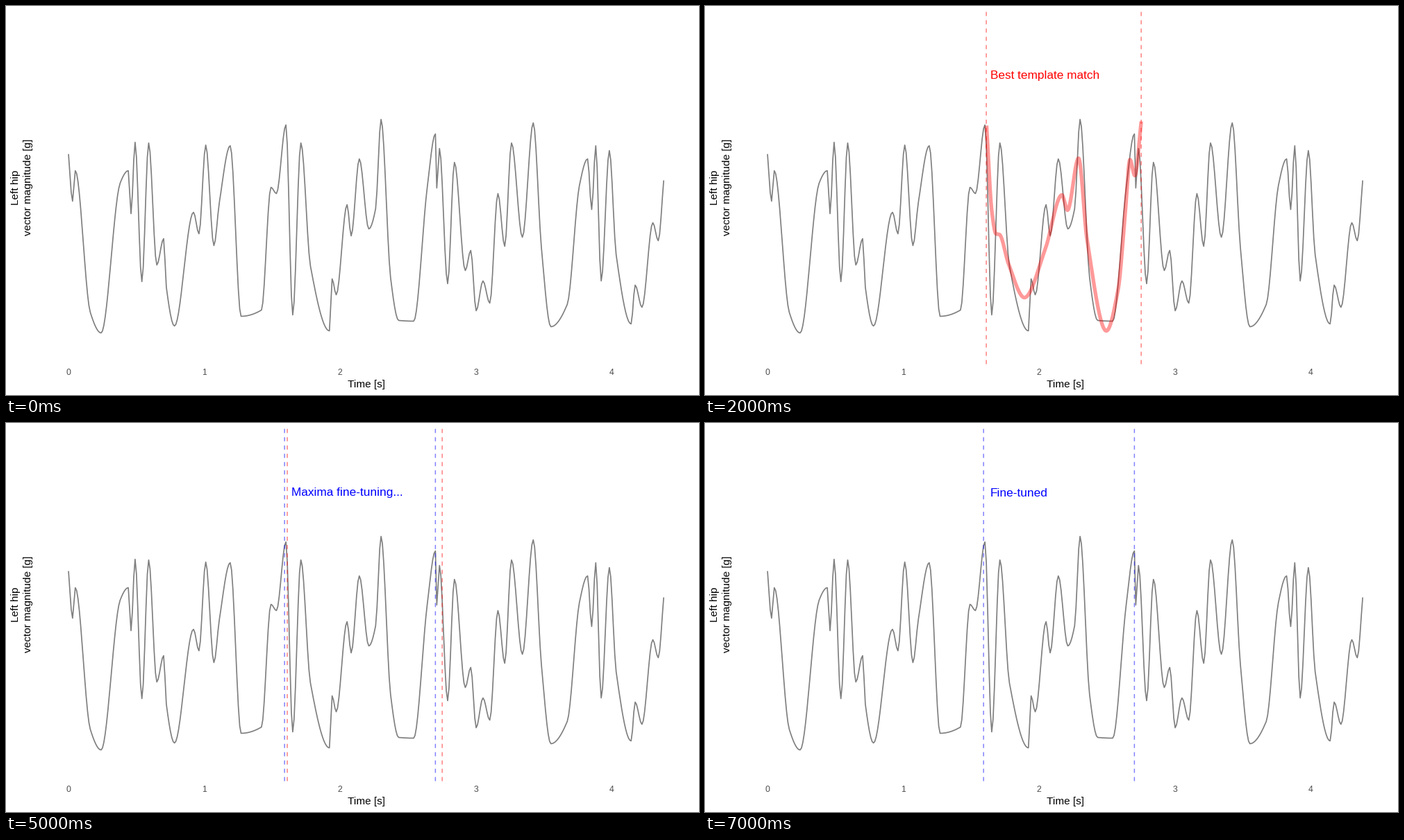
A matplotlib script that plays this animation: 998x561 px, repeating every 8000 ms.

```python
import numpy as np
import matplotlib.pyplot as plt
from matplotlib.animation import FuncAnimation

W, H, DPI = 998, 561, 100
X0, STEP = 90.0, 1.957          # pixel of time zero, pixels per 0.01 s sample
TOP, BOTTOM = 8, 516
PT = 72 / DPI                   # points per pixel

plt.rcParams["font.family"] = "Liberation Sans"

# Main turning points of the signal: (sample, pixel height)
SIGNAL = [
    (0, 213), (3, 281), (5, 237), (16, 441), (24, 471), (38, 255), (44, 237),
    (46, 299), (49, 196), (54, 397), (59, 197), (65, 373), (70, 335),
    (72, 405), (78, 461), (92, 297), (96, 328), (101, 200), (107, 345),
    (111, 283), (119, 201), (127, 447), (142, 438), (149, 261), (153, 270),
    (160, 171), (165, 445), (171, 197), (178, 374), (192, 468), (194, 393),
    (197, 416), (205, 286), (208, 331), (214, 220), (221, 321), (226, 292),
    (230, 163), (237, 391), (243, 453), (254, 454), (264, 261), (270, 184),
    (271, 262), (273, 205), (279, 400), (284, 225), (292, 381), (296, 352),
    (300, 439), (305, 396), (310, 428), (316, 270), (321, 346), (326, 197),
    (334, 333), (342, 168), (348, 348), (355, 462), (367, 430), (376, 258),
    (382, 220), (385, 293), (388, 201), (392, 396), (398, 208), (403, 358),
    (414, 458), (417, 402), (422, 434), (430, 312), (434, 338), (438, 251),
]

# Key points of the matched template in pixels
TEMPLATE = [
    (405.5, 172), (413, 295), (419, 328), (424, 329), (437, 371), (460, 420),
    (490, 350), (514, 272), (522, 294), (538, 219), (550, 335), (578, 468),
    (595, 408), (605, 300), (612, 221), (619, 244), (628.3, 166),
]


def smooth(points, x):
    """Monotone cubic curve through the points, flat at every extremum."""
    px, py = np.array(points, float).T
    h = np.diff(px)
    d = np.diff(py) / h
    slope = np.zeros_like(py)
    slope[0], slope[-1] = d[0], d[-1]
    a, b = d[:-1], d[1:]
    same = a * b > 0
    slope[1:-1][same] = 2 * a[same] * b[same] / (a[same] + b[same])
    i = np.clip(np.searchsorted(px, x, "right") - 1, 0, len(h) - 1)
    t = (x - px[i]) / h[i]
    return ((1 + 2 * t) * (1 - t) ** 2 * py[i] + t ** 2 * (3 - 2 * t) * py[i + 1]
            + h[i] * t * (1 - t) * ((1 - t) * slope[i] - t * slope[i + 1]))


fig = plt.figure(figsize=(W / DPI, H / DPI), dpi=DPI, facecolor="white")
ax = fig.add_axes([0, 0, 1, 1])
ax.set_xlim(0, W)
ax.set_ylim(H - 0.5, -0.5)
ax.axis("off")


def label(x, y, text, px, color="black", ha="center", angle=0):
    return ax.text(x, y, text, fontsize=px * PT, color=color, ha=ha,
                   va="baseline", rotation=angle, rotation_mode="anchor")


def marker(sample, color):
    """Dashed line with a dash at both ends."""
    x = X0 + sample * STEP
    width = (BOTTOM - TOP) / 42.5 / 8
    return ax.plot([x, x], [BOTTOM, TOP], color=color, alpha=0.5, lw=width * PT,
                   ls=(0, (4, 4)), dash_capstyle="butt", snap=False, zorder=4)[0]


k = np.arange(439)
ax.plot(X0 + k * STEP, smooth(SIGNAL, k), color="black", alpha=0.5,
        lw=1.7 * PT, solid_capstyle="butt", solid_joinstyle="round", zorder=2)

tx = np.linspace(TEMPLATE[0][0], TEMPLATE[-1][0], 400)
template, = ax.plot(tx, smooth(TEMPLATE, tx), color="red", alpha=0.4,
                    lw=5.3 * PT, solid_capstyle="butt", zorder=3)

for second in range(5):
    label(X0 - 0.5 + second * 100 * STEP, 532, str(second), 12.3, "#4d4d4d")
label(518.6, 550, "Time [s]", 15.4)
label(18.5, 261, "Left hip", 15.4, angle=90)
label(36, 261, "vector magnitude [g]", 15.4, angle=90)

first_guess = [marker(s, "red") for s in (161, 275)]
tuned = [marker(s, "blue") for s in (159, 270)]
note = label(410.8, 105, "", 17.25, ha="left")


def draw(step):
    template.set_visible(1 <= step < 4)
    for line in first_guess:
        line.set_visible(2 <= step < 6)
    for line in tuned:
        line.set_visible(step >= 5)
    if step == 0:
        note.set_text("")
    elif step < 3:
        note.set_text("Best template match")
    elif step < 7:
        note.set_text("Maxima fine-tuning...")
    else:
        note.set_text("Fine-tuned")
    note.set_color("red" if step < 3 else "blue")
    return [template, note, *first_guess, *tuned]


anim = FuncAnimation(fig, draw, frames=8, interval=1000, repeat=True,
                     repeat_delay=0, blit=False)
plt.show()
```
